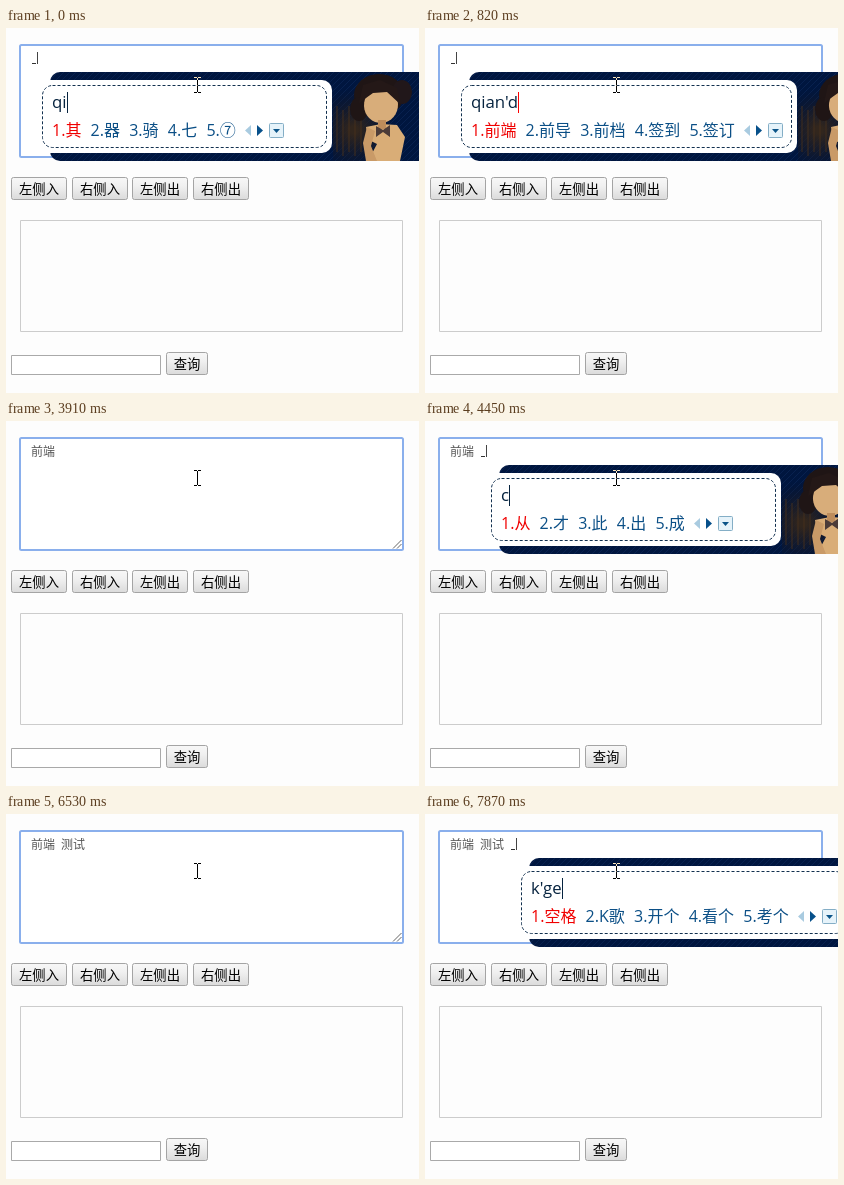
Write an HTML page with a canvas that moves like this. It is 413 by 365 pixels and loops after 8 s.

```html
<!DOCTYPE html>
<html lang="zh-CN">
<head>
<meta charset="utf-8">
<style>
html, body { margin: 0; width: 100%; height: 100%; overflow: hidden; background: #fdfdfd; }
canvas { display: block; }
</style>
</head>
<body>
<canvas id="stage" width="413" height="365"></canvas>
<script>
const ctx = document.getElementById('stage').getContext('2d');
const LOOP = 8000;
const CJK = '"Noto Sans CJK SC", "Noto Sans CJK", sans-serif';
const MIXED = '"Open Sans", ' + CJK;

// Each step: start time, committed text, caret on, typed letters, candidates
const steps = [
  [0, '', 1, 'qi', '其 器 骑 七 ⑦'],
  [130, '', 1, 'qia', '恰 卡 掐 洽 髂'],
  [260, '', 1, 'qian', '前 钱 千 签 欠'],
  [390, '', 1, 'qi', '其 器 骑 七 ⑦'],
  [520, '', 1, 'q', '去 请 前 其 全'],
  [680, '', 1, 'qia', '恰 卡 掐 洽 髂'],
  [820, '', 1, "qian'd", '前端 前导 前档 签到 签订'],
  [940, '', 1, "qian'du", '前端 前度 签督 千度 牵渡'],
  [1080, '', 1, "qian'duan", '前端 前段 牵断 千端 浅短'],
  [1510, '前端', 1],
  [2060, '前端', 0],
  [2580, '前端', 1],
  [3110, '前端', 0],
  [3370, '前端 ', 1],
  [3910, '前端 ', 0],
  [4450, '前端 ', 1, 'c', '从 才 此 出 成'],
  [4880, '前端 ', 1, "c'sh", '测试 此时 城市 上传时 尝试'],
  [5020, '前端 ', 1, "c'shi", '测试 此时 初始 才是 尝试'],
  [5550, '前端 测试', 1],
  [5970, '前端 测试 ', 1],
  [6530, '前端 测试 ', 0],
  [6810, '前端 测试 ', 1, 'k', '看 可 快 开 困'],
  [7340, '前端 测试 ', 0, 'k', '看 可 快 开 困'],
  [7600, '前端 测试 ', 1, 'k', '看 可 快 开 困'],
  [7750, '前端 测试 ', 1, "k'g", '空格 看过 开关 可观 开工'],
  [7870, '前端 测试 ', 1, "k'ge", '空格 K歌 开个 看个 考个']
];

function rect(x, y, w, h, color) {
  ctx.fillStyle = color;
  ctx.fillRect(x, y, w, h);
}

function round(x, y, w, h, r, fill, line, width = 1) {
  ctx.beginPath();
  ctx.roundRect(x, y, w, h, r);
  if (fill) { ctx.fillStyle = fill; ctx.fill(); }
  if (line) { ctx.strokeStyle = line; ctx.lineWidth = width; ctx.stroke(); }
}

function poly(points, color) {
  ctx.beginPath();
  for (let i = 0; i < points.length; i += 2) ctx.lineTo(points[i], points[i + 1]);
  ctx.fillStyle = color;
  ctx.fill();
}

function oval(x, y, rx, ry, color, turn = 0) {
  ctx.beginPath();
  ctx.ellipse(x, y, rx, ry, turn, 0, Math.PI * 2);
  ctx.fillStyle = color;
  ctx.fill();
}

function text(str, x, y, font, color) {
  ctx.font = font;
  ctx.fillStyle = color;
  ctx.fillText(str, x, y);
  return ctx.measureText(str).width;
}

function button(x, y, w, label) {
  const g = ctx.createLinearGradient(0, y, 0, y + 23);
  g.addColorStop(0, '#f8f8f8');
  g.addColorStop(0.4, '#f0f0f0');
  g.addColorStop(1, '#dadada');
  round(x + 0.5, y + 0.5, w - 1, 22, 2, g, '#a4a4a4');
  ctx.textAlign = 'center';
  text(label, x + w / 2, y + 16.5, '13.33px ' + CJK, '#000');
  ctx.textAlign = 'left';
}

function page() {
  rect(0, 0, 413, 365, '#fdfdfd');
  round(14, 17, 383, 112, 1.5, '#fff', '#8aafec', 2);
  ctx.strokeStyle = '#666';
  ctx.lineWidth = 1;
  ctx.beginPath();
  for (const d of [8, 4]) {
    ctx.moveTo(395 - d, 127.5);
    ctx.lineTo(395.5, 127 - d);
  }
  ctx.stroke();
  ['左侧入', '右侧入', '左侧出', '右侧出'].forEach((s, i) => button([5, 66, 126, 187][i], 149, 56, s));
  round(14.5, 192.5, 382, 111, 0, null, '#ccc');
  round(5.5, 327.5, 149, 19, 0, '#fff', '#a9a9a9');
  button(160, 324, 42, '查询');
}

function field(str, caret, composing) {
  let x = 25;
  for (const c of str) {
    if (c !== ' ') text(c, x, 34.5, '12px ' + CJK, '#555');
    x += c === ' ' ? 6 : 12;
  }
  if (composing) {
    rect(x + 1, 35, 4, 1, '#333');
    x += 6;
  }
  if (caret) rect(x, 24, 1, 12, '#444');
}

// Flat faceless figure at the right end of the panel
function figure(dx) {
  ctx.save();
  ctx.translate(dx, 0);
  const g = ctx.createRadialGradient(348, 102, 4, 348, 102, 42);
  g.addColorStop(0, '#32261d');
  g.addColorStop(1, 'rgba(18,18,28,0)');
  rect(327, 44, 90, 89, g);
  for (let i = 0; i < 5; i++) rect(330 + i * 6, 78 + i % 2 * 4, 2, 46, 'rgba(70,48,28,.45)');
  oval(373, 67, 25, 21, '#1f1515');
  oval(396, 64, 10, 12, '#21171a');
  oval(353, 81, 9, 12, '#1f1515');
  poly([360, 99, 375, 96, 391, 97, 399, 109, 394, 133, 362, 133, 371, 116, 363, 112], '#d9ad77');
  poly([361, 99, 369, 103, 365, 118, 371, 133, 360, 133, 357, 115], '#c99a67');
  oval(375, 77, 17, 18, '#d8ad7a', 0.15);
  rect(372, 92, 8, 9, '#bd8c5b');
  poly([353, 75, 357, 57, 374, 52, 391, 60, 394, 76, 381, 64, 367, 65], '#241817');
  poly([370, 98, 377, 102, 384, 97, 384, 109, 377, 104, 370, 109], '#4b3b38');
  ctx.restore();
}

function panel(left, typed, words, caret) {
  const font = '16px ' + MIXED;
  ctx.font = font;
  const items = words.split(' ').map((w, i) => (i + 1) + '.' + w);
  let x = left + 15;
  const spots = items.map(s => {
    const at = x;
    x += ctx.measureText(s).width + 9.2;
    return at;
  });
  x = Math.round(x);
  const right = Math.max(left + 295, x + 53);

  ctx.save();
  ctx.beginPath();
  ctx.roundRect(left + 13, 44, 420, 89, 10);
  ctx.clip();
  rect(left + 13, 44, 420, 89, '#00163f');
  ctx.strokeStyle = 'rgba(30,62,120,.28)';
  ctx.lineWidth = 1;
  ctx.beginPath();
  for (let i = left - 80; i < 420; i += 6) {
    ctx.moveTo(i, 133);
    ctx.lineTo(i + 89, 44);
  }
  ctx.stroke();
  figure(right - 326);
  ctx.restore();

  round(left, 52, right - left, 73, 10, '#fff');
  ctx.setLineDash([3, 2]);
  round(left + 5.5, 57.5, right - left - 11, 62, 10, null, '#12304f');
  ctx.setLineDash([]);

  const w = text(typed, left + 15, 80, '16.8px ' + MIXED, '#06233f');
  if (caret) rect(Math.round(left + 15.5 + w), 64, 1, 21, typed === "qian'd" ? '#f00' : '#06233f');
  items.forEach((s, i) => text(s, spots[i], 108, font, i ? '#0b4f86' : '#f00000'));

  poly([x + 6, 97, x, 102.5, x + 6, 108], '#a9cbe0');
  poly([x + 12, 97, x + 18, 102.5, x + 12, 108], '#07508a');
  round(x + 24.5, 95.5, 14, 14, 1, '#e6f3fa', '#84aec6');
  poly([x + 28, 101, x + 35, 101, x + 31.5, 105], '#0b5488');
}

function pointer() {
  ctx.globalCompositeOperation = 'difference';
  rect(191, 50, 1, 14, '#fff');
  for (const y of [49, 64]) {
    rect(188, y, 3, 1, '#fff');
    rect(192, y, 3, 1, '#fff');
  }
  ctx.globalCompositeOperation = 'source-over';
}

function draw(now) {
  const t = now % LOOP;
  const [, str, caret, typed, words] = steps.findLast(s => s[0] <= t);
  page();
  field(str, caret, typed);
  if (typed) {
    const left = 31 + 30 * str.split(' ').filter(Boolean).length;
    panel(left, typed, words, caret);
  }
  pointer();
}

const start = performance.now();
function tick() {
  draw(performance.now() - start);
  requestAnimationFrame(tick);
}
tick();
</script>
</body>
</html>
```
